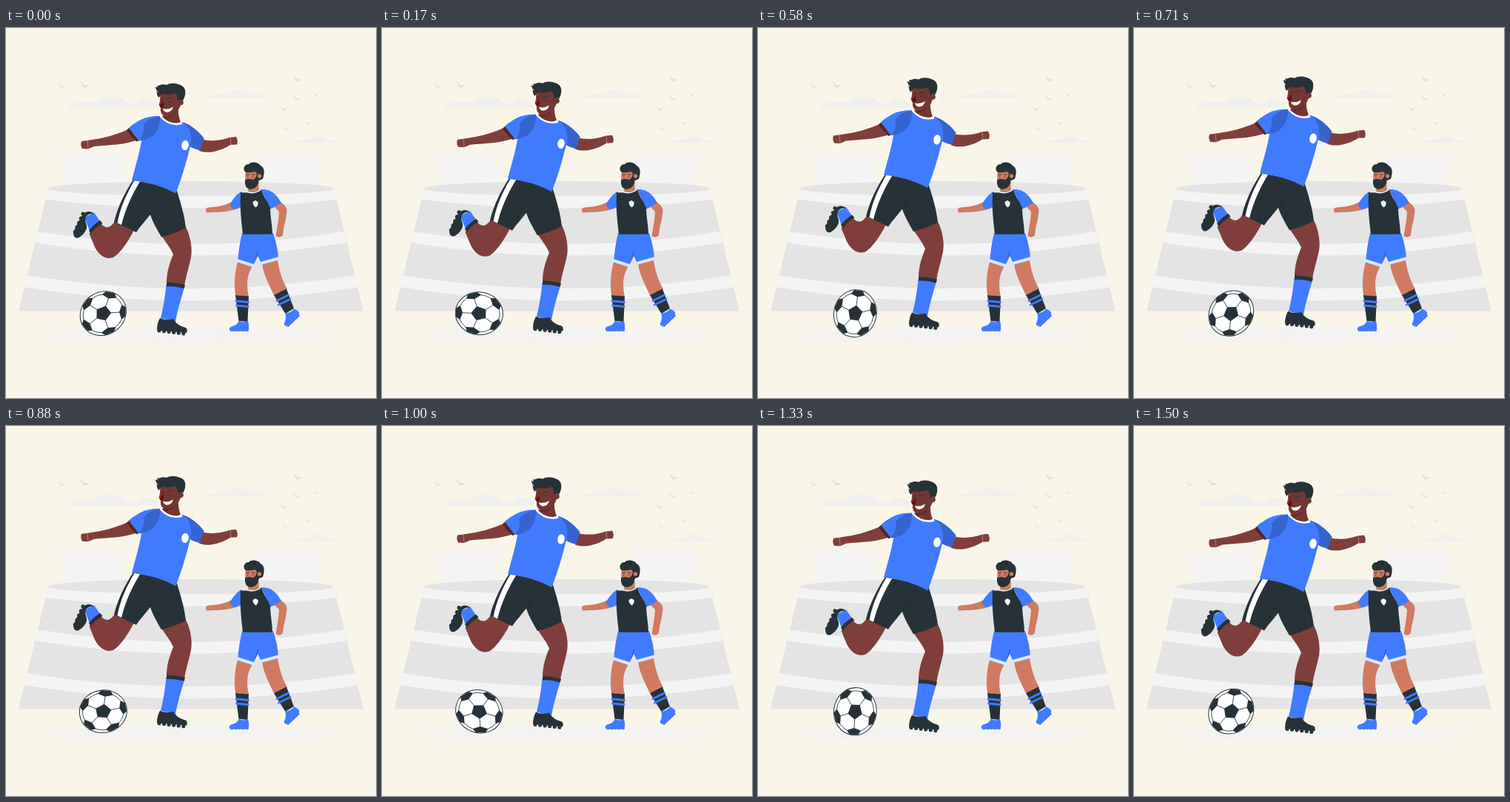
These frames come from a looping animation (500 px wide and 500 px high, 1.54 s). An HTML page:

```html
<!DOCTYPE html>
<html lang="en">
<head>
<meta charset="utf-8">
<title>Football players</title>
<style>
  html, body { margin: 0; width: 100%; height: 100%; overflow: hidden; background: #faf5e9; }
  svg { display: block; width: 100vw; height: 100vh; }
  .ink { fill: #263238; }
  .blue { fill: #407bff; }
  .skin { fill: #7f3e3b; }
  .face { fill: #743633; }
  .tan { fill: #d07a62; }
  .white { fill: #fff; }
  .shade { fill: #3563cf; }
  .grey { fill: #e4e4e4; }
  .pale { fill: #f4f4f4; }
  .mist { fill: #efefee; }
  .line { fill: none; stroke-linecap: round; stroke-linejoin: round; }
  .dark { stroke: #263238; }
</style>
</head>
<body>
<svg viewBox="0 0 500 500">
  <rect width="500" height="500" fill="#faf5e9"/>

  <g class="line" stroke="#f6f1e5">
    <rect x="38.500" y="54.500" width="212" height="328"/>
    <rect x="253.500" y="54.500" width="207" height="328"/>
    <path d="M0 382.500H500"/>
  </g>

  <g id="sky" class="mist">
    <path d="M86 107.500C85 102 92 100 97 101C105 99 113 102 121 101C123 94 134 91 141 94C149 92 157 95 160 99C165 99 169 101 171 105C175 105 174 102 177 101C180 96 190 95 194 99C201 98 206 102 205 107.500Z"/>
    <path d="M271 95C270 91 278 90 283 91C290 89 296 91 301 90C304 84 312 82 318 86C324 83 330 86 331 90C338 89 352 90 352 95Z"/>
    <path d="M386 155.500C386 152 393 152 398 152C402 152 407 152 410 151C412 146 419 145 423 148C429 146 433 149 434 152C440 151 447 152 447 155.500Z"/>
  </g>
  <g id="birds" fill="#dededc"></g>

  <g id="stadium">
    <path class="pale" d="M73 169.500H162L155 215H82ZM338 169.500H427L418 215H345Z"/>
    <path class="grey" d="M57 217H443L483 382.500H17Z"/>
    <path class="pale" d="M57 216Q250 236 443 216L446.500 232Q250 255 53.500 232Z"/>
    <ellipse class="grey" cx="250" cy="217" rx="193" ry="10"/>
    <path class="pale" d="M43 275Q250 309 457 275L460.500 290Q250 325 39.500 290Z"/>
    <path class="pale" d="M28 334Q250 370 472 334L476 350Q250 387 24 350Z"/>
  </g>
  <ellipse cx="250" cy="416" rx="193" ry="11.300" fill="#f3f3f2"/>

  <g id="rival">
    <path class="tan" d="M305 235C295 240 286 241.500 278 242L271 243Q269 247 271 249.500L280 249C292 249 303 248 316 243Z"/>
    <path class="tan" d="M357 236L369 233C375 238 379 241 379.500 246C379 257 376 266 375 272L374 280Q370 285 364.500 281L366 272C367 264 369 256 369 248L362 241Z"/>
    <path class="tan" d="M313 316L333 322C327 332 324 342 328 363L310 361C308 346 309 330 313 316Z"/>
    <path class="tan" d="M346 319L367 313C369 328 373 340 380 353L362 361C356 348 349 336 346 319Z"/>
    <path class="ink" d="M310 361L328 362.500L326.500 397L314.500 396Z"/>
    <path class="ink" d="M362 361L379 352.500L389 379L377.500 386Z"/>
    <path class="line" stroke="#407bff" stroke-width="3" stroke-linecap="butt" d="M311 369L327.500 370.500M311.500 375L327 376.500M366 368.500L381.500 361M368.500 374L384 366.500"/>
    <path class="blue" d="M314.500 396Q321 399 327 395.500Q329 402 328 408.500H302Q301 404 306 403Q313 401 314.500 396Z"/>
    <path class="blue" d="M377.500 385.500Q385 385 389.500 379.500Q394 381 396.500 385Q396 391 390 395Q386 401 379 403Q375 402 376 398.500Q379 394 377.500 385.500Z"/>
    <path class="line" stroke="#407bff" stroke-width="2" stroke-dasharray="3 2" stroke-linecap="butt" d="M304 409H327M381 403L396 389"/>
    <path class="blue" d="M319 277H361C365 289 368 301 368 313L346 319.500L340 308L333 323L313 317C314 303 316 290 319 277Z"/>
    <path class="line" stroke="#dce8ff" stroke-width="4" stroke-linecap="butt" d="M313.500 314.500L333.500 321M346 317.500L368 311.500"/>
    <path class="shade" d="M340 308L336 317L338 306L342 299Z"/>
    <path class="blue" d="M318 221C311 225 306 232 302.500 238.500L307 245.500L318 242Z"/>
    <path class="blue" d="M345 218C358 217 367 226 371.500 236Q365 242 357 244.500Z"/>
    <path class="ink" d="M317 222Q332 224 345 218C348 228 354 235 357 243C357 255 360 267 360 278.500Q340 279 320 278.500C318 260 316 246 317 222Z"/>
    <path class="tan" d="M328 209L341 205L342 219Q335 224 327 221Z"/>
    <path class="line" stroke="#f4f4f4" stroke-width="1.500" d="M326 221.500Q336 225 344 218.500"/>
    <path class="tan" d="M324 192L342 191Q345 203 340 210L325 212Q322 203 324 192Z"/>
    <path class="ink" d="M323 205Q329 203 334 205Q338 203 339 197L343 198L341 210Q338 218 329 218Q322 216 323 205Z"/>
    <path class="ink" d="M324 195C319 191 322 184 328 184C331 180 341 181 344 186C349 188 350 195 347 204L342 206L339 198Q339 195 336 194Q330 196 324 195Z"/>
    <circle class="tan" cx="342.500" cy="200" r="2.700"/>
    <path class="line dark" stroke-width="1.100" d="M325 198.500L328.500 198M333 198L336 198.500M326.500 201V201.500M333.500 201V201.500"/>
    <path class="white" d="M333.500 235L337 233L340.500 235Q341.500 240 337.500 242.500Q333.500 240 333.500 235Z"/>
  </g>

  <g id="ball"></g>

  <g id="striker">
    <path class="skin" d="M147 261L175 269C166 288 154 305 145 310C134 314 125 306 120 296L112.500 278L127.500 263C134 272 141 271 147 261Z"/>
    <path class="blue" d="M106 256L119 249.500L127 261L113 274Z"/>
    <path class="ink" d="M112 273.500Q119 265 127 260L130.500 264Q121 269 114.500 278Z"/>
    <path class="ink" d="M119 251C115 247 108 247 104 252C99 260 93 270 91 278Q92 285 98 283.500L103 280Q110 273 109 267Q106 259 108 255Q113 250 119 251Z"/>
    <path class="line dark" stroke-width="5" stroke-dasharray=".1 6.500" d="M104 251L92.500 277"/>

    <path class="skin" d="M210 280L243 269C250 283 252 299 250 310C247 324 243 336 241 348L217 345C217 330 221 318 226 306C222 296 215 289 210 280Z"/>
    <path class="blue" d="M216.500 348L241 350.500C236 368 232 380 229 397L209 392C213 376 215 362 216.500 348Z"/>
    <path class="ink" d="M217.500 343.500Q230 344 242 347L240.800 352Q228 348.500 216.500 349Z"/>
    <path class="ink" d="M208 392Q217 396 226 393Q230 400 237 403L243 405Q246 408 244 412L204 408.500Q204 399 208 392Z"/>
    <path class="line dark" stroke-width="5" stroke-dasharray=".1 6.500" d="M207 409L242 413.200"/>

    <path class="ink" d="M172 205L230 217C236 236 241 252 243 270Q228 278 210 282.500C204 272 198 262 195 252C189 260 182 267 176 276Q160 268 146 262C151 242 160 223 172 205Z"/>
    <path class="line" stroke="#1b2428" d="M195 252Q199 247 203 240"/>
    <path class="white" d="M173.500 206H182C172 222 162 242 156 266L150.500 263.500C154 243 163 224 173.500 206Z"/>

    <path class="skin" d="M167 136C155 142 137 148 119 150.500L110 152L102 153Q100 158 103 163L111 163.500L119 160C140 158 160 158 179 151Z"/>
    <path class="skin" d="M263 150C278 154 290 152 302 148L311 147Q314 152 312 157.500L303 158C292 165 276 171 261 166Z"/>
    <path class="line" stroke="#c99c92" stroke-width=".7" d="M110 152.500L111 163M303 148.500L304 157.500"/>
    <path fill="#4f2627" d="M163 138L172 130L184 150L176.500 153.500Q169 147 163 138Z"/>

    <path class="shade" d="M238 127C249 130 260 139 267.500 149L262 165.500Q252 163 245 158Z"/>
    <path class="blue" d="M208 119Q223 132 239 128C250 135 253 149 248 164C243 184 237 204 229.500 223.500Q203 209 170 206C175 186 181 168 184 147Q190 122 208 119Z"/>
    <path class="blue" d="M208 119C190 118 177 125 166 135L179.500 152.500C198 151 208 139 208 119Z"/>
    <path class="shade" d="M208 119C198 120 190 125 186 131C187 140 185 147 179.500 152.500C199 151 209 138 208 119Z"/>
    <ellipse class="white" cx="242" cy="158.500" rx="4.800" ry="6.700" transform="rotate(8 242 158.500)"/>

    <path class="face" d="M216 110L233 105Q232 118 236 127Q222 133 210 120Q216 118 216 110Z"/>
    <path fill="#5e2826" d="M215 118.500Q225 118 231 112Q227 121 214 122Z"/>
    <path class="line" stroke="#fff" stroke-width="2.500" d="M209 119.500Q221 133 237 129"/>
    <path class="face" d="M208 89Q222 80 237 90Q239 105 230 114Q222 121 214 119Q208 116 209 108L206.500 104Q209 98 208 89Z"/>
    <path class="ink" d="M207 94C203 92 205 88 203 86L207 87C202 85 204 82 201 80L206 80C203 79 204 77 206 78C210 76 214 76 217 77C223 73 234 75 239 79C244 83 243 92 239 98L236 96L232 99Q233 92 229 88Q220 91 212 89Q208 90 207 94Z"/>
    <circle class="face" cx="236" cy="100.500" r="3.800"/>
    <path class="line dark" stroke-width="1" d="M209.500 95.500L213 97M218 96Q221 93.500 224 95M212.500 99.500V101M221 99V100.500"/>
    <path fill="#630f0f" d="M213 99Q208 104 208 106.500Q210 108.500 213 107Z"/>
    <path class="white" d="M212 109Q219 111 226 106.500Q224 114 217 114Q213 113 212 109Z"/>
  </g>
</svg>
<script>
  const LOOP = 1540;
  const $ = id => document.getElementById(id);
  const striker = $('striker'), ball = $('ball');

  function buildBirds() {
    const spots = [[75, 78, 1], [106, 77, 1.4], [393, 69, 1.3], [393, 95, 1], [418, 90, .7],
      [375, 109, 1], [408, 128, .7], [377, 136, .7]];
    $('birds').innerHTML = spots.map(([x, y, k]) =>
      `<path transform="translate(${x} ${y}) scale(${k})" d="M-5 -4Q-1 -2 0 0.500Q2 -0.500 5.500 1.500Q2 1 -0.500 3Q-2 -1 -5 -4Z"/>`).join('');
  }

  // Point on the oval ball: radius as a share of the rim, angle clockwise from the top.
  const RX = 29.2, RY = 32.5;
  const at = (r, deg) => {
    const a = deg * Math.PI / 180;
    return (RX * r * Math.sin(a)).toFixed(2) + ' ' + (-RY * r * Math.cos(a)).toFixed(2);
  };

  // A truncated icosahedron seen square on to one of its pentagons.
  function buildBall() {
    const core = [];
    let patches = '', seams = '';
    for (let i = 0; i < 5; i++) {
      const a = i * 72 - 4;
      core.push(at(.343, a));
      patches += `M${at(.687, a)}L${at(.857, a + 22.4)}L${at(.985, a + 11.8)}L${at(.985, a - 11.8)}L${at(.857, a - 22.4)}Z`;
      seams += `M${at(.34, a)}L${at(.69, a)}M${at(.857, a + 22.4)}L${at(.86, a + 36)}L${at(.857, a + 49.6)}`;
    }
    ball.innerHTML = `<ellipse class="white" rx="${RX}" ry="${RY}"/>
      <path class="ink" d="${patches}M${core.join('L')}Z"/>
      <path class="line dark" stroke-width=".8" d="${seams}"/>
      <ellipse class="line dark" rx="${RX - .4}" ry="${RY - .4}"/>`;
  }

  function draw(t) {
    const phase = (t + 55) % LOOP / LOOP;
    const lift = 10 * (1 - Math.abs(2 * phase - 1));
    striker.setAttribute('transform', `translate(0 ${(.7 - lift).toFixed(3)})`);
    const turn = 360 * (t - 530) / LOOP;
    ball.setAttribute('transform', `translate(131.300 385.700) rotate(${turn.toFixed(3)})`);
  }

  buildBirds();
  buildBall();
  draw(0);
  const start = performance.now();
  function tick() {
    draw((performance.now() - start) % LOOP);
    requestAnimationFrame(tick);
  }
  requestAnimationFrame(tick);
</script>
</body>
</html>
```
